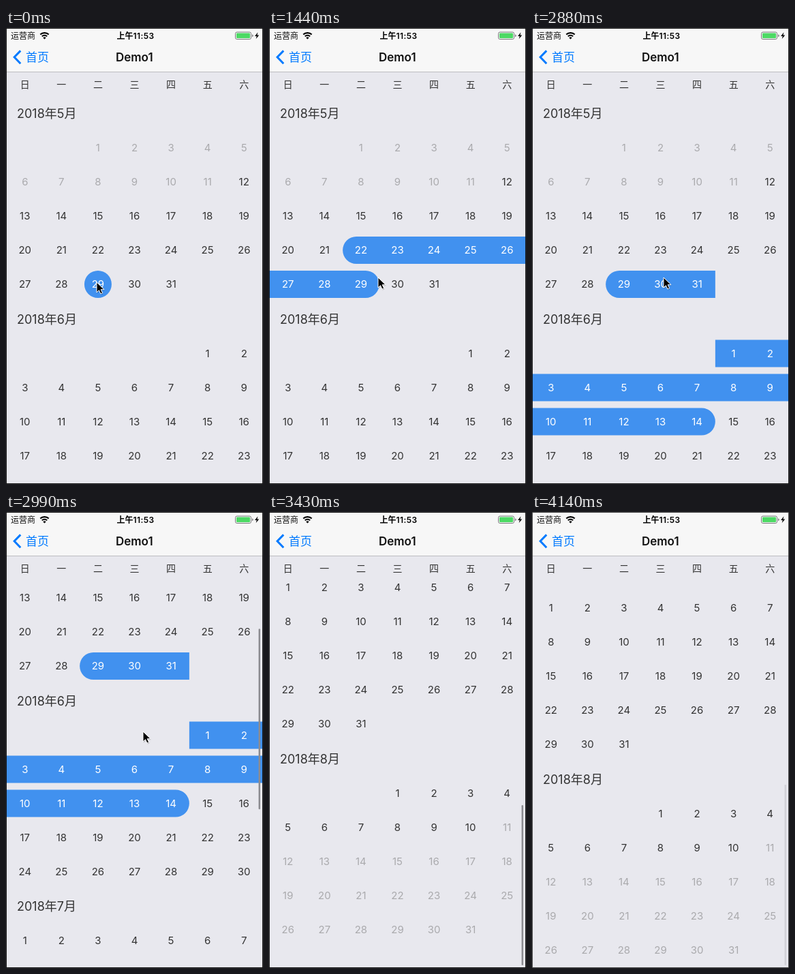
Recreate the animation shown at these times as an HTML page. Size 377 by 669 pixels, loop 4240 ms.

```html
<!DOCTYPE html>
<html lang="zh">
<head>
<meta charset="utf-8">
<title>Calendar range selection</title>
<style>
html, body { margin: 0; width: 100%; height: 100%; overflow: hidden; background: #e8e8ee; }
svg { display: block; width: 377px; height: 669px; }
text { font-family: Inter, "Noto Sans CJK SC", "Noto Sans CJK", sans-serif; fill: #333; }
.mid { text-anchor: middle; }
.day { font-size: 15px; }
.week { font-size: 14px; }
.month { font-size: 18px; }
</style>
</head>
<body>
<svg viewBox="0 0 377 669" xmlns="http://www.w3.org/2000/svg">
  <defs><clipPath id="view"><rect x="1" y="99" width="375" height="569"/></clipPath></defs>
  <rect width="377" height="669" fill="#e8e8ee"/>
  <g clip-path="url(#view)">
    <g id="content">
      <path id="range" fill="#4191ef"/>
    </g>
  </g>
  <rect id="bar" x="370.5" width="2.5" rx="1.25" fill="#8c8c91"/>
  <g id="weekdays"></g>

  <rect x="1" y="1" width="375" height="63.5" fill="#f7f7f7"/>
  <rect x="1" y="64" width="375" height="1" fill="#bdbdc0"/>
  <text x="7" y="15.6" font-size="12" style="fill:#111">运营商</text>
  <g fill="none" stroke="#000" stroke-width="2.1">
    <path d="M50.3 9.6a8.9 8.9 0 0 1 12.4 0"/>
    <path d="M52.8 12.3a5.4 5.4 0 0 1 7.4 0"/>
  </g>
  <path d="M54.3 14.2a3.2 3.2 0 0 1 4.4 0L56.5 16.5z"/>
  <text class="mid" x="190" y="15.6" font-size="12" font-weight="600" style="fill:#000">上午<tspan letter-spacing=".4">11:53</tspan></text>
  <rect x="336.5" y="6" width="23" height="10.5" rx="2.3" fill="none" stroke="#77777a"/>
  <rect x="338" y="7.5" width="20" height="7.5" rx="1" fill="#4cd964"/>
  <path d="M361 9.3q1.6 .3 1.6 2t-1.6 2z" fill="#77777a"/>
  <path d="M369.4 6.3 365 11.9h2.7l-1 4.2 4.5-5.7h-2.8z"/>
  <path d="M21.3 33.4 12.2 42.8l9.1 9.4" fill="none" stroke="#007aff" stroke-width="3"/>
  <text x="29" y="49" font-size="17" style="fill:#007aff">首页</text>
  <text class="mid" x="188.3" y="48.8" font-size="17" font-weight="600" style="fill:#111">Demo1</text>

  <g id="cursor">
    <path d="M.8 1.6v15l3.6-3.3 2.4 5.2 2.7-1.2-2.4-5h5z" fill="#000" opacity=".2"/>
    <path d="M0 0v15l3.5-3.3 2.4 5.3 2.7-1.2-2.4-5.1h4.9z" stroke="#fff" stroke-width="1"/>
  </g>
  <rect id="edge" x=".5" y=".5" width="376" height="668" fill="none" stroke="#111"/>
</svg>
<script>
const LOOP = 4240, CELL = 375 / 7, MAX_SCROLL = 638, ANCHOR = 529;
const $ = id => document.getElementById(id);

// Bursts of motion: first step, last step, number of steps
const bursts = [
  [810, 1090, 7], [1270, 1780, 10], [1840, 2180, 7], [2420, 2650, 5],
  [2820, 3160, 7], [3250, 3310, 2], [3370, 3840, 9], [3900, 3960, 2]
];
const steps = [0];
for (const [a, b, n] of bursts)
  for (let i = 0; i < n; i++) steps.push(Math.round((a + (b - a) * i / (n - 1)) / 10) * 10);
steps.push(4140);

// Time, x, y of the pointer tip
const pointer = [
  [760, 133, 373], [860, 135, 352], [960, 138, 315], [1090, 141, 284],
  [1220, 141, 284], [1330, 148, 312], [1440, 160, 366], [1550, 174, 430],
  [1670, 187, 505], [1780, 196, 546], [1840, 208, 558], [1950, 243, 577],
  [2010, 257, 582], [2070, 259, 585], [2180, 257, 580],
  [2370, 257, 580], [2480, 238, 551], [2590, 200, 477], [2650, 189, 456],
  [2770, 189, 456], [2820, 190, 428], [2880, 193, 366], [2990, 201, 322],
  [3160, 207, 300]
];
const scrolling = [
  [2880, 0], [2930, 48], [2990, 150], [3050, 255], [3100, 341],
  [3160, 433.5], [3250, 590], [3310, 650], [3370, 667], [3430, 668]
];
// Time and moving end of the range, as month * 100 + day
const picks = [
  [0, 529], [900, 522], [990, 515], [1380, 522], [1490, 529], [1550, 530],
  [1610, 531], [1660, 606], [1890, 607], [1950, 613], [2010, 614]
];
// Month, first weekday, length
const months = [[5, 2, 31], [6, 5, 30], [7, 0, 31], [8, 3, 31]];

const lastAt = (list, t) => list.filter(k => k[0] <= t).pop();

function along(keys, t) {
  const i = keys.findIndex(k => k[0] > t);
  if (i < 0) return keys[keys.length - 1].slice(1);
  if (i === 0) return keys[0].slice(1);
  const a = keys[i - 1], b = keys[i], p = (t - a[0]) / (b[0] - a[0]);
  return a.slice(1).map((v, j) => v + (b[j + 1] - v) * p);
}

function scrollAt(t) {
  if (t <= 3430) return along(scrolling, t)[0];
  const k = (t - 3430) / 75;
  return MAX_SCROLL + 30 * (1 + k) * Math.exp(-k);
}

function label(parent, cls, x, y, str) {
  const el = document.createElementNS('http://www.w3.org/2000/svg', 'text');
  el.setAttribute('class', cls);
  el.setAttribute('x', x);
  el.setAttribute('y', y);
  el.textContent = str;
  parent.append(el);
  return el;
}

const colX = c => 1 + CELL * c;
const days = [];
months.forEach(([m, first, count], i) => {
  const top = 301.5 * i;
  label($('content'), 'month', 16, top + 132.2, `2018年${m}月`);
  for (let d = 1; d <= count; d++) {
    const slot = first + d - 1, col = slot % 7;
    const y = top + 176 + 50 * Math.floor(slot / 7);
    const el = label($('content'), 'day mid', colX(col + .5), y + 5.4, d);
    days.push({ el, col, y, id: m * 100 + d });
  }
});
[...'日一二三四五六'].forEach((s, c) => label($('weekdays'), 'week mid', colX(c + .5), 87.8, s));

function band(x0, x1, y, capL, capR) {
  const a = capL ? 20 : 0, b = capR ? 20 : 0;
  return `M${x0 + a} ${y - 20}H${x1 - b}` +
    (capR ? 'a20 20 0 0 1 0 40' : 'v40') + `H${x0 + a}` +
    (capL ? 'a20 20 0 0 1 0 -40' : 'v-40') + 'z';
}

function rangePath(from, to) {
  const rows = new Map();
  for (const d of days) {
    if (d.id < from || d.id > to) continue;
    if (!rows.has(d.y)) rows.set(d.y, []);
    rows.get(d.y).push(d);
  }
  let path = '';
  for (const [y, row] of rows) {
    const a = row[0], b = row[row.length - 1];
    const inset = from === to ? CELL / 2 - 20 : 0;
    path += band(colX(a.col) + inset, colX(b.col + 1) - inset, y, a.id === from, b.id === to);
  }
  return path;
}

function draw(t) {
  const pick = lastAt(picks, t)[1];
  const from = Math.min(pick, ANCHOR), to = Math.max(pick, ANCHOR);
  $('range').setAttribute('d', rangePath(from, to));
  for (const d of days) {
    const chosen = d.id >= from && d.id <= to, off = d.id < 512 || d.id > 810;
    d.el.style.fill = chosen ? '#fff' : off ? '#aaaaad' : '#333';
  }

  const s = Math.round(scrollAt(t) * 2) / 2;
  $('content').setAttribute('transform', `translate(0 ${-s})`);
  const top = 101 + s * 299 / MAX_SCROLL;
  const over = Math.max(0, s - MAX_SCROLL);
  const y = over ? 400 + over : top;
  $('bar').setAttribute('y', y);
  $('bar').setAttribute('height', 265 - over);
  $('bar').setAttribute('opacity', s <= 0 ? 0 : t >= 4140 ? .25 : 1);

  const [x, py] = along(pointer, t);
  $('cursor').setAttribute('transform', `translate(${x} ${py})`);
  $('cursor').setAttribute('visibility', t < 3250 ? 'visible' : 'hidden');
  $('edge').setAttribute('stroke', t >= 4140 ? '#3c3c3c' : '#111');
}

const start = performance.now();
let shown = -1;
function tick() {
  const t = (performance.now() - start) % LOOP;
  const step = steps.filter(s => s <= t).pop();
  if (step !== shown) draw(shown = step);
  requestAnimationFrame(tick);
}
tick();
</script>
</body>
</html>
```
